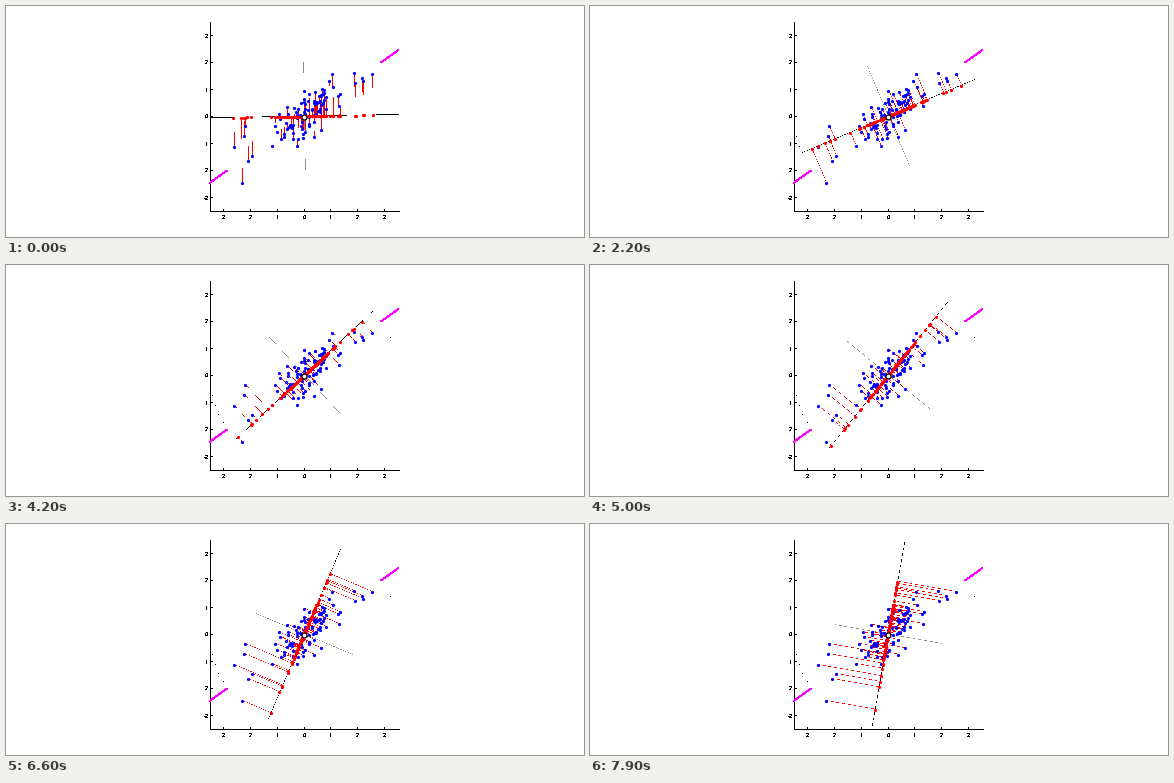
A matplotlib script for the animation above (8000 ms loop, 578 by 231 pixels).

```python
import numpy as np
import matplotlib.pyplot as plt
from matplotlib.animation import FuncAnimation

W, H, DPI = 578, 231, 72          # one point equals one pixel
FRAMES, STEP_MS = 80, 100
CENTER = np.array([298, 110.5])
UNIT = 94 / 3.5                   # pixels per data unit
LEFT, TOP, RIGHT, BOTTOM = 204, 16, 393, 205
AXIS_LEN, PERP_LEN = 3.5 * UNIT, 2 * UNIT

# A seeded correlated cloud, plus the few samples that stand apart from it
OUTLIERS = [(228, 141), (236, 177), (239, 120), (238, 130), (242, 155), (246, 150),
            (326, 68), (348, 67), (349, 77), (356, 72), (357, 75), (366, 68)]
rng = np.random.default_rng(42)
N_CORE = 100 - len(OUTLIERS)
core_x = rng.triangular(-37, 0, 45, N_CORE)
core_y = -0.6 * core_x + np.clip(rng.normal(0, 12, N_CORE), -26, 26)
offsets = np.vstack([OUTLIERS - CENTER, np.column_stack([core_x, core_y])])

fig = plt.figure(figsize=(W / DPI, H / DPI), dpi=DPI, facecolor="white")
ax = fig.add_axes([0, 0, 1, 1])
ax.set_xlim(0, W)
ax.set_ylim(H, 0)
ax.axis("off")


def stroke(xs, ys, color="black"):
    ax.plot(xs, ys, color=color, lw=1, zorder=1, antialiased=False,
            solid_capstyle="butt")


def layer(marker, color, z, size=1):
    return ax.plot([], [], marker, color=color, ms=size, mew=0, zorder=z,
                   antialiased=False)[0]


def label(x, y, text):
    ax.text(x, y, text, size=6, family="Liberation Sans", antialiased=False,
            ha="center", va="center_baseline")


def direction(deg):
    t = np.radians(deg)
    return np.array([np.cos(t), -np.sin(t)])


def hairline(start, end):
    """Half-pixel line sampled on every second row and column, so it breaks up."""
    a, b = 2 * np.asarray(start), 2 * np.asarray(end)
    n = int(np.ceil(np.abs(b - a).max())) + 1
    grid = np.rint(np.linspace(a, b, n)).astype(int)
    keep = (grid[:, 0] % 2 == 0) & (grid[:, 1] % 2 == 1)
    return grid[keep] / 2 + CENTER


def place(artist, xy):
    xy = np.reshape(xy, (-1, 2))
    artist.set_data(xy[:, 0], xy[:, 1])


# Axes, ticks and labels
stroke([LEFT, LEFT], [TOP, BOTTOM])
stroke([LEFT, RIGHT], [BOTTOM, BOTTOM])
for k in range(-3, 4):
    x, y = np.floor(CENTER + (k * UNIT, -k * UNIT))
    stroke([x, x], [BOTTOM - 2, BOTTOM])
    stroke([LEFT, LEFT + 2], [y, y])
    label(x, 211, str(abs(k)))
    label(200, y + 0.5, "-3" if k == -3 else str(abs(k)))

# Ends of the principal direction
for side in (-1, 1):
    tips = CENTER + side * np.array([(77, -54), (94.5, -66.5)])
    stroke(tips[:, 0], tips[:, 1], "magenta")

perp = layer(",", "0.55", 2)
axis = layer(",", "black", 3)
links = layer(",", "red", 4)
samples = layer("o", "blue", 5, 3.2)
shadows = layer("o", "red", 6, 3.2)
specks = layer(",", "black", 2)
place(samples, CENTER + offsets)
ax.plot(*CENTER, "o", ms=5, mfc="white", mec="black", mew=1.3, zorder=7)


def update(i):
    deg = i + 1
    w, n = direction(deg), direction(deg + 90)
    proj = np.outer(offsets @ w, w)

    place(axis, hairline(-AXIS_LEN * w, AXIS_LEN * w))
    place(perp, hairline(-PERP_LEN * n, PERP_LEN * n))
    place(links, np.vstack([hairline(p, q) for p, q in zip(offsets, proj)]))
    place(shadows, CENTER + proj)

    # Specks left behind by the sweeping line ends
    passed = [a + 180 for a in range(13, 32, 6) if a < deg] + [23] * (deg > 23)
    place(specks, [np.floor(CENTER + AXIS_LEN * direction(a)) for a in passed])
    return axis, perp, links, shadows, specks


anim = FuncAnimation(fig, update, frames=FRAMES, interval=STEP_MS,
                     repeat=True, repeat_delay=0, blit=False)
plt.show()
```
